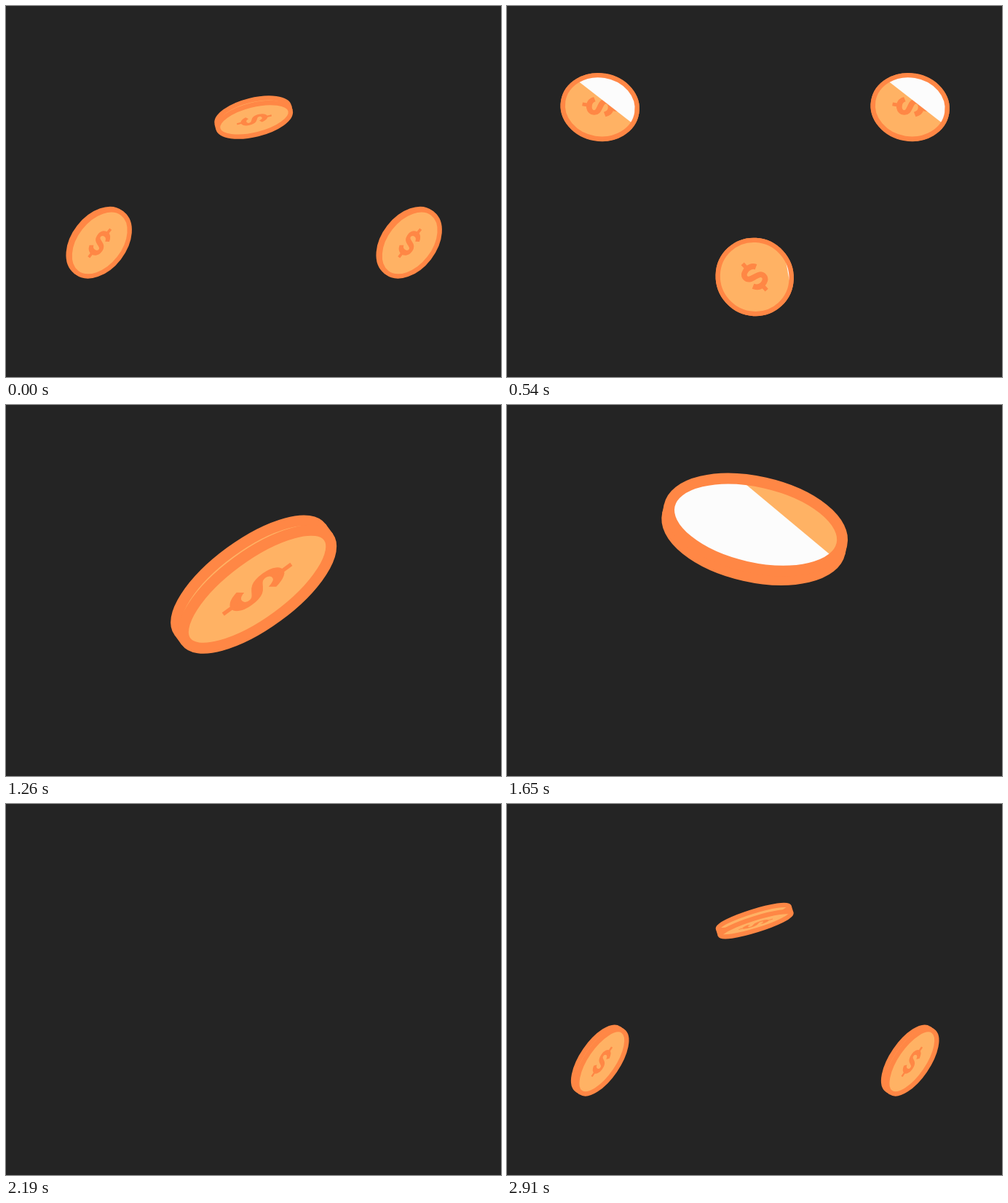
An HTML page with a canvas for the animation above (2940 ms loop, 680 by 510 pixels).

```html
<!DOCTYPE html>
<html lang="en">
<head>
<meta charset="utf-8">
<title>Coin toss</title>
<style>
html, body { margin: 0; width: 100%; height: 100%; overflow: hidden; background: #242424; }
canvas { display: block; width: 680px; height: 510px; }
</style>
</head>
<body>
<canvas id="stage" width="680" height="510"></canvas>
<script>
const ctx = document.getElementById('stage').getContext('2d');
const LOOP = 2940, STEP = 30;
const BACK = '#242424', RIM = '#ff8745', GOLD = '#ffb264', WHITE = '#fcfcfc';
const RADIUS = 51.2, STROKE = 6.3, HALF_DEPTH = 5.2;
const TAU = Math.PI * 2, RAD = Math.PI / 180;

const smallSpin = base => d => base - 0.45 * d + 7.5e-5 * d * d;
const largeSpin = d => d < 0
  ? -53 - 0.157 * d + 6.3e-4 * d * d
  : -53 - 0.12 * d - 2e-4 * d * d;

// apex: time of the highest point; rise and fall: travel 500 ms away from it
const side = {
  apex: 491, top: 135.2, rise: 198, power: 2.27, fall: 400, size: 1,
  roll: d => 3.7 + 0.114 * d, spin: smallSpin(-190), shine: 478, slant: 32.7
};
const coins = [
  { ...side, x: 127.7 },
  { ...side, x: 553.7 },
  { ...side, x: 340.2, apex: 155, top: 135.3, rise: 185, power: 2,
    spin: smallSpin(-185), shine: 538 },
  { ...side, x: 340.2, apex: 1590, top: 166, rise: 185, power: 2, fall: 332, size: 2.37,
    roll: d => 5.2 + 0.1256 * d, spin: largeSpin, shine: 1480, slant: 46.5 }
];

const dollar = new Path2D(
  'M10.5-8C8-13 4-15 0-15C-6-15-10.5-12-10.5-8C-10.5-2-5-1.2 0 0' +
  'C5 1.2 10.5 2 10.5 8C10.5 12 6 15 0 15C-5 15-9 13-11 9');
const stubs = new Path2D('M0-24.5V-14M0 14V24.5');

function disc(y, squash) {
  ctx.beginPath();
  ctx.ellipse(0, y, RADIUS, RADIUS * squash, 0, 0, TAU);
}

function ring(y, squash) {
  disc(y, squash);
  ctx.lineWidth = STROKE;
  ctx.strokeStyle = RIM;
  ctx.stroke();
}

function drawDollar() {
  ctx.save();
  ctx.rotate(Math.PI / 2);
  ctx.strokeStyle = RIM;
  ctx.lineWidth = 7.8;
  ctx.stroke(dollar);
  ctx.lineWidth = 5.8;
  ctx.stroke(stubs);
  ctx.restore();
}

function drawShine(coin, t) {
  const inner = RADIUS - STROKE / 2;
  const lead = 1 - (t - coin.shine) * 0.0125;
  if (lead > 1 || lead < -2.6) return;
  ctx.save();
  ctx.rotate((coin.slant - 90) * RAD);
  ctx.fillStyle = WHITE;
  ctx.fillRect(lead * inner, -60, 1.6 * inner, 120);
  ctx.restore();
}

function drawFace(coin, t, y, squash) {
  ctx.save();
  disc(y, squash);
  ctx.fillStyle = GOLD;
  ctx.fill();
  ctx.clip();
  ctx.translate(0, y);
  ctx.scale(1, squash);
  drawDollar();
  drawShine(coin, t);
  ctx.restore();
}

function drawBody(shift, squash) {
  const edge = RADIUS + STROKE / 2, half = Math.abs(shift);
  ctx.fillStyle = RIM;
  ctx.fillRect(-edge, -half, 2 * edge, 2 * half);
  disc(-shift, squash);
  ctx.fillStyle = GOLD;
  ctx.fill();
  ring(-shift, squash);
}

function drawCoin(coin, t) {
  const d = t - coin.apex;
  const away = Math.abs(d) / 500;
  const y = coin.top + (d < 0 ? coin.rise * Math.pow(away, coin.power) : coin.fall * away * away);
  if (y > 660) return;

  const spin = coin.spin(d) * RAD;
  const facing = Math.cos(spin) < 0 ? -1 : 1;
  const squash = Math.max(0.002, Math.abs(Math.cos(spin)));
  // rounded edge: depth only shows at steep tilts
  const shift = HALF_DEPTH * Math.pow(Math.sin(spin) * facing, 5);

  ctx.save();
  ctx.translate(coin.x, y);
  ctx.rotate(coin.roll(d) * RAD);
  ctx.scale(coin.size, coin.size);
  drawBody(shift, squash);
  drawFace(coin, t, shift, squash);
  ring(shift, squash);
  ctx.restore();
}

function render(now) {
  let t = Math.floor((now % LOOP) / STEP) * STEP;
  if (t < 60) t = 0;
  if (t > 2250) t -= LOOP;
  ctx.fillStyle = BACK;
  ctx.fillRect(0, 0, 680, 510);
  for (const coin of coins) drawCoin(coin, t);
}

const start = performance.now();
function tick() {
  render(performance.now() - start);
  requestAnimationFrame(tick);
}
tick();
</script>
</body>
</html>
```
